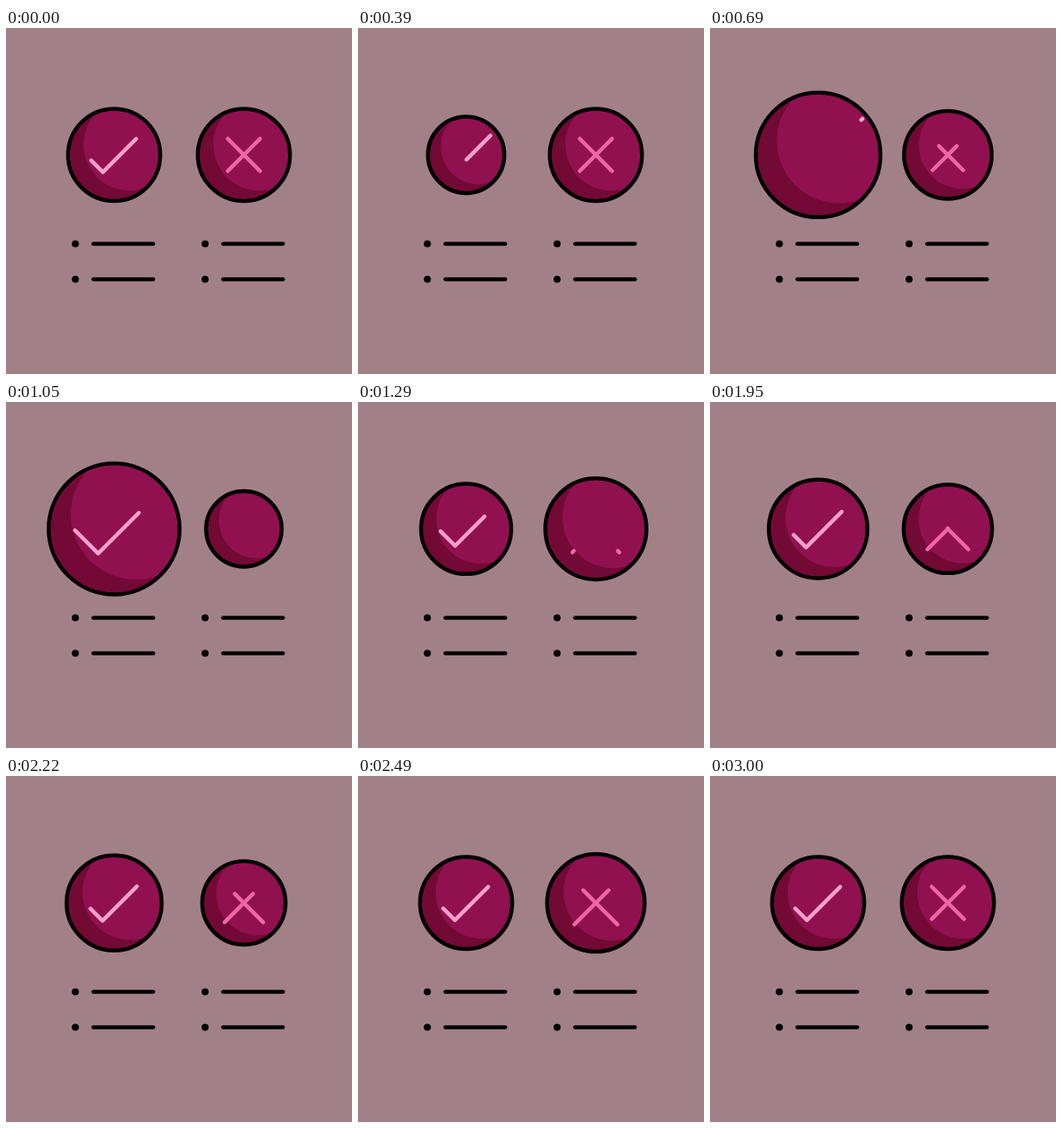
Animation of 400x400 px, one loop 5.09 s. Source, as an HTML page with a canvas:

```html
<!DOCTYPE html>
<html lang="en">
<head>
<meta charset="utf-8">
<title>Pros and cons</title>
<style>
html, body { margin: 0; width: 100%; height: 100%; overflow: hidden; background: #a28088; }
canvas { display: block; width: 100vmin; height: 100vmin; }
</style>
</head>
<body>
<canvas id="stage"></canvas>
<script>
const LOOP = 5090, BASE = 53.3, LINE = 4.5;
const canvas = document.getElementById('stage');
const ctx = canvas.getContext('2d');

const ease = (p) => p < 0.5 ? 4 * p ** 3 : 1 - 4 * (1 - p) ** 3;

function progress(t, start, end) {
  return Math.min(1, Math.max(0, (t - start) / (end - start)));
}

function tween(t, start, end, from, to) {
  return from + (to - from) * ease(progress(t, start, end));
}

// A disc shrinks, swells to its peak, then rings down to rest.
function swell(t, beats, peak) {
  const poses = [1, 0.82, peak, 0.9, 1.07, 1];
  return beats.slice(1).reduce(
    (scale, end, i) => scale + tween(t, beats[i], end, 0, poses[i + 1] - poses[i]), 1);
}

const leftScale = (t) => swell(t, [0, 300, 900, 1480, 1980, 2450], 1.46);
const rightScale = (t) => swell(t, [450, 1040, 1550, 2130, 2620, 3000], 1.4);

// Each trim gives the visible stretch [from, to] of a mark, before scaling.
function checkTrim(t) {
  const start = -13.5, end = 38.5, exit = 51;
  if (t < 720) return [tween(t, 0, 830, start, exit), tween(t, 0, 690, end, exit)];
  const drift = tween(t, 1050, 1620, -5.4, 0);
  return [start + drift, tween(t, 720, 1050, start, end) + drift];
}

function crossTrim(t) {
  const end = 18.7, exit = 25;
  if (t < 1100) return [tween(t, 543, 960, -end, exit), tween(t, 690, 960, end, exit)];
  const drift = tween(t, 2200, 3000, 6, 0);
  const dip = 12.2 * Math.sin(Math.PI * progress(t, 1620, 2280)) ** 2;
  return [tween(t, 1200, 1620, end, -end) + drift + dip, end + drift];
}

function stroke(points, color) {
  ctx.beginPath();
  points.forEach(([x, y]) => ctx.lineTo(x, y));
  ctx.strokeStyle = color;
  ctx.lineWidth = LINE;
  ctx.stroke();
}

function circle(x, y, r) {
  ctx.beginPath();
  ctx.arc(x, y, r, 0, Math.PI * 2);
}

function fillCircle(x, y, r, color) {
  circle(x, y, r);
  ctx.fillStyle = color;
  ctx.fill();
}

function disc(k) {
  const r = BASE * k;
  fillCircle(0, 0, r, '#720a35');
  ctx.save();
  ctx.clip();
  fillCircle(18 * k, -12 * k, r, '#911150');
  ctx.restore();
  circle(0, 0, r);
  ctx.strokeStyle = '#000';
  ctx.lineWidth = LINE;
  ctx.stroke();
}

function check(t, k) {
  const [from, to] = checkTrim(t);
  if (to - from < 0.1) return;
  const at = (s) => [(s - 13) * k, (20 - Math.abs(s)) * k];
  const stops = from < 0 && to > 0 ? [from, 0, to] : [from, to];
  stroke(stops.map(at), '#f9a0cd');
}

function cross(t, k) {
  const [from, to] = crossTrim(t);
  if (to - from < 0.1) return;
  for (const side of [1, -1]) {
    stroke([from, to].map((s) => [side * s * k, s * k]), '#ee66a8');
  }
}

function column(x, scale, mark, t) {
  ctx.save();
  ctx.translate(x, 146.7);
  disc(scale);
  mark(t, scale);
  ctx.restore();
  for (const y of [249.5, 290.5]) {
    fillCircle(x - 44.8, y, 4.1, '#000');
    stroke([[x - 24, y], [x + 45.2, y]], '#000');
  }
}

function resize() {
  const size = Math.min(innerWidth, innerHeight) * (window.devicePixelRatio || 1);
  canvas.width = canvas.height = Math.max(1, Math.round(size));
}

function draw() {
  const t = performance.now() % LOOP;
  const zoom = canvas.width / 400;
  ctx.setTransform(zoom, 0, 0, zoom, 0, 0);
  ctx.fillStyle = '#a28088';
  ctx.fillRect(0, 0, 400, 400);
  ctx.lineCap = ctx.lineJoin = 'round';
  column(125, leftScale(t), check, t);
  column(275, rightScale(t), cross, t);
  requestAnimationFrame(draw);
}

addEventListener('resize', resize);
resize();
draw();
</script>
</body>
</html>
```
